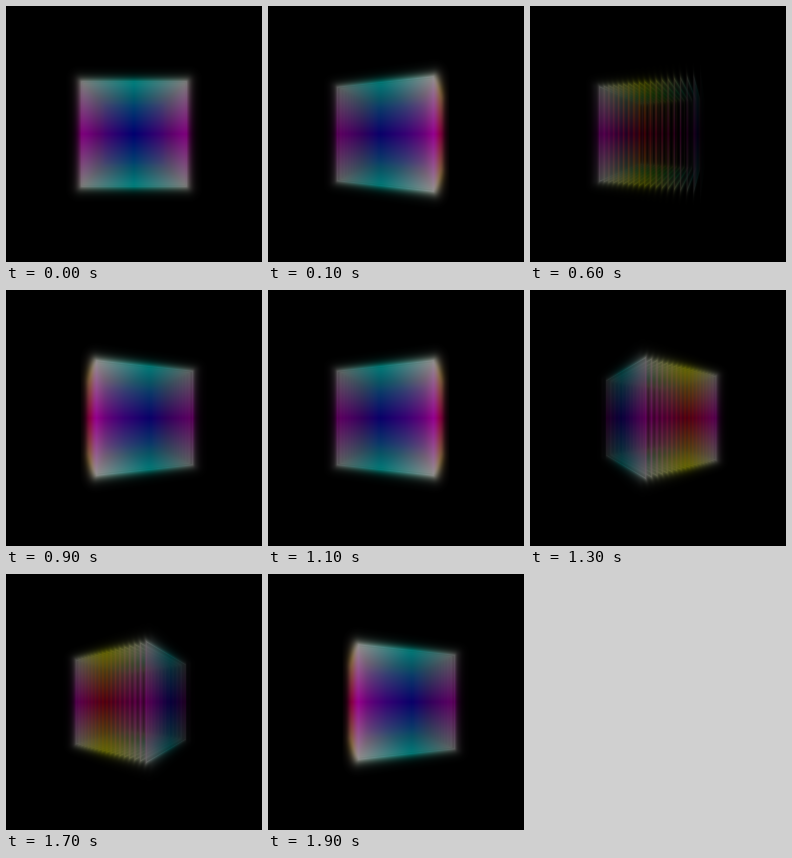
An HTML page with a canvas that plays this animation: 256x256 px, repeating every 2000 ms.

```html
<!DOCTYPE html>
<html lang="en">
<head>
<meta charset="utf-8">
<title>Glowing cube</title>
<style>
  html, body { margin: 0; width: 100%; height: 100%; overflow: hidden; background: #000; }
  canvas { display: block; width: 100vmin; height: 100vmin; }
</style>
</head>
<body>
<canvas id="stage" width="256" height="256"></canvas>
<script>
const SIZE = 256, MID = SIZE / 2;
const STEP_MS = 100, POSES = 10;       // half a turn looks the same as none
const FOCAL = 158, CAMERA = 4;
const SLICE_GAP = 0.115, SLICES = 11;  // slices on each side of the middle
const GLOW_IN = 0.08, GLOW_OUT = 0.05;
const GAIN = 118, OPACITY = 0.9, FADE = 0.4;
const SAMPLES = 3;
const AREA = { left: 56, right: 202, top: 48, bottom: 208 };

const ctx = document.getElementById('stage').getContext('2d');

// Brightness of the shell around the unit cube; arguments are absolute values.
function glow(x, y, z) {
  const qx = x - 1, qy = y - 1, qz = z - 1;
  const inside = Math.max(qx, qy, qz);
  if (inside <= 0) return Math.exp(inside / GLOW_IN);
  if (inside > 0.3) return 0;
  const dist = Math.hypot(Math.max(qx, 0), Math.max(qy, 0), Math.max(qz, 0));
  return Math.exp(-dist / GLOW_OUT);
}

// Adds the light met by one ray through the stack of slices, front to back.
function trace(u, v, cos, sin, sum) {
  const ox = CAMERA * sin, oz = CAMERA * cos;
  const dx = u * cos - sin, dz = -u * sin - cos;
  const dir = dz < 0 ? -1 : 1;
  const facing = Math.sqrt(Math.abs(dz));   // slices dim when seen edge-on
  let through = 1;
  for (let k = -SLICES; k < SLICES; k++) {
    const slice = (k + 0.5) * dir * SLICE_GAP;
    const t = (slice - oz) / dz;
    if (t <= 0) continue;
    const x = Math.abs(ox + dx * t), y = Math.abs(v * t), z = Math.abs(slice);
    const density = glow(x, y, z);
    if (density < 0.004) continue;
    const light = density * through * facing * Math.exp(-FADE * (t - CAMERA + 1));
    sum[0] += x * light;
    sum[1] += y * light;
    sum[2] += z * light;
    through *= 1 - OPACITY * density;
  }
}

function renderPose(index) {
  const angle = index / POSES * Math.PI;
  const cos = Math.cos(angle), sin = Math.sin(angle);
  const image = ctx.createImageData(SIZE, SIZE);
  const data = image.data;
  for (let i = 3; i < data.length; i += 4) data[i] = 255;

  for (let py = AREA.top; py < AREA.bottom; py++) {
    const v = (py + 0.5 - MID) / FOCAL;
    for (let px = AREA.left; px < AREA.right; px++) {
      const sum = [0, 0, 0];
      for (let s = 0; s < SAMPLES; s++) {
        trace((px + (s + 0.5) / SAMPLES - MID) / FOCAL, v, cos, sin, sum);
      }
      const at = (py * SIZE + px) * 4;
      for (let c = 0; c < 3; c++) data[at + c] = sum[c] / SAMPLES * GAIN;
    }
  }
  return image;
}

const poses = Array.from({ length: POSES }, (_, i) => renderPose(i));
const start = performance.now();

function draw() {
  const time = Math.max(0, performance.now() - start);
  ctx.putImageData(poses[Math.floor(time / STEP_MS) % POSES], 0, 0);
  requestAnimationFrame(draw);
}
draw();
</script>
</body>
</html>
```
